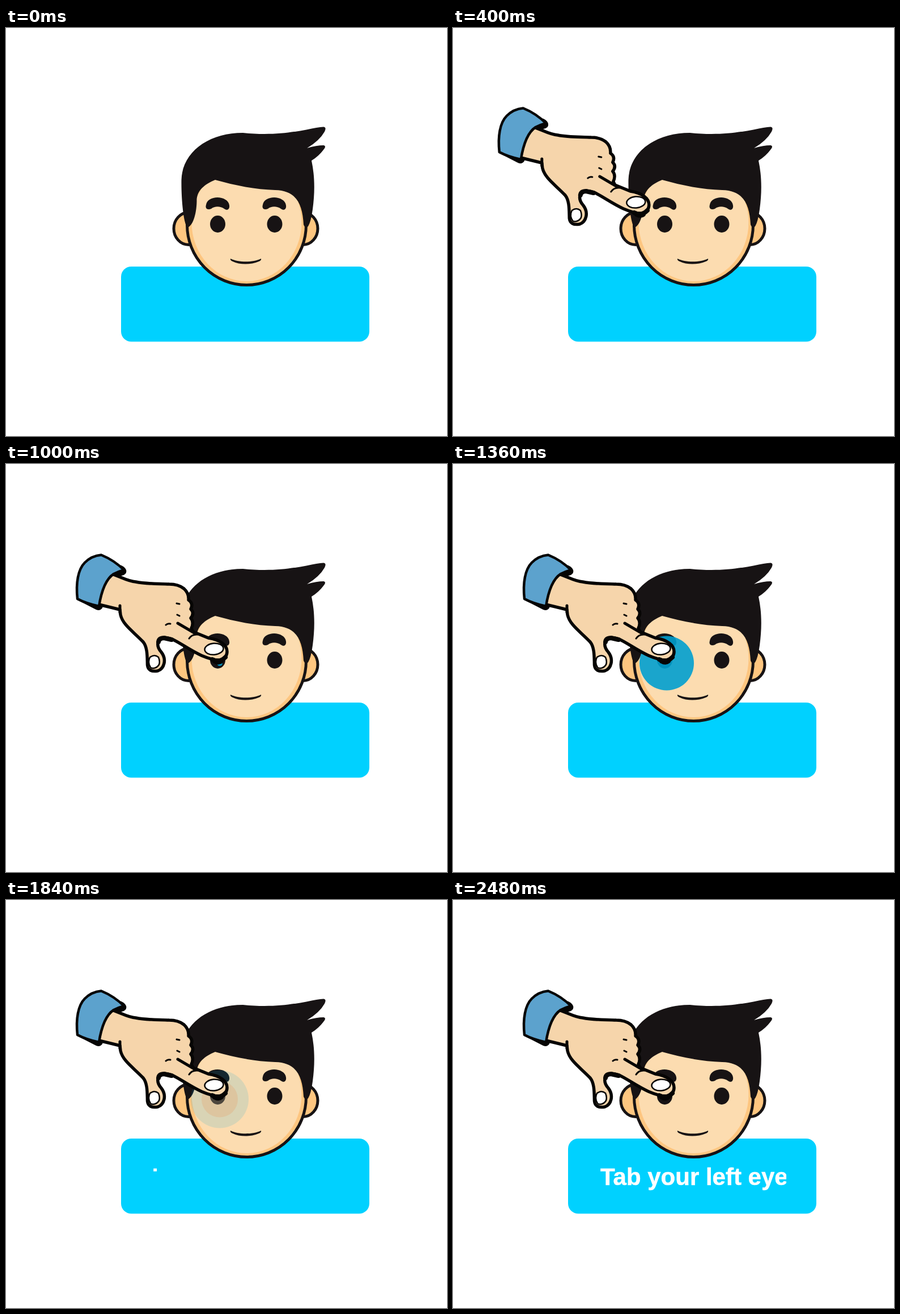
Animation of 778x720 px, one loop 4800 ms. Source, as an HTML page:

```html
<!DOCTYPE html>
<html lang="en">
<head>
<meta charset="utf-8">
<title>Tab your left eye</title>
<style>
html, body { margin: 0; width: 100%; height: 100%; overflow: hidden; background: #fff; }
svg { display: block; width: 100%; height: 100%; }
text { font: bold 42px "Liberation Sans", Arial, sans-serif; fill: #fff; stroke: #fff; stroke-width: .6; stroke-linejoin: round; }
.ink { fill: #171314; }
.line { fill: none; stroke: #060504; stroke-width: 3; }
.bold { stroke-width: 5; }
.heavy { stroke-width: 8; }
</style>
</head>
<body>
<svg viewBox="0 0 778 720">
  <defs>
    <clipPath id="wipe"><rect id="cover" x="250" y="460" width="0" height="60"/></clipPath>
    <path id="brow" d="M353 312C354 304 363 299 373 299S393 304 394 313C395 320 390 323 385 319C378 314 368 314 362 319C355 322 351 318 353 312Z"/>
  </defs>

  <rect x="203" y="421" width="438" height="132.5" rx="18" fill="#00d1ff"/>
  <text x="260" y="502.5" clip-path="url(#wipe)">Tab your left eye</text>

  <g id="head">
    <g fill="#fec680" stroke="#171314" stroke-width="5">
      <ellipse cx="322" cy="354" rx="26" ry="28.5"/>
      <ellipse cx="524" cy="354" rx="26" ry="28.5"/>
      <ellipse cx="424.5" cy="347.5" rx="105" ry="106"/>
    </g>
    <ellipse cx="424.5" cy="343" rx="97" ry="104" fill="#fcdcb0"/>
    <g class="ink">
      <path d="M320 352C313 345 309 300 309.5 268C311 218 358 185 418 185C465 190 500 185 530 179.5Q550 175 560 174.5Q566 175 562 183Q553 199 531 212Q548 207 560 207Q566 208 560 215Q552 226 539 234C545 262 545 290 541 320Q538 342 533 350Q528 355 525 347C523 310 512 287 475 286C440 285 405 278 369 268C350 276 336 287 336.5 306C336 330 329 350 320 352Z"/>
      <use href="#brow"/>
      <use href="#brow" x="100"/>
      <ellipse cx="373.5" cy="346" rx="13.5" ry="15"/>
      <ellipse cx="474" cy="346" rx="13.5" ry="15"/>
      <path d="M396 407C410 414 436 414 450 407Q451 410 446 412C432 418 412 418 400 412Q395 410 396 407Z"/>
    </g>
  </g>

  <g id="ripple">
    <circle cx="377" cy="351.5"/>
    <circle cx="377" cy="351.5"/>
    <circle cx="376" cy="351.5"/>
  </g>

  <g id="hand" stroke-linejoin="round" stroke-linecap="round">
    <path fill="#060504" d="M126 240L157 256Q165 261 170 254L172 246L204 197Q214 195 212 187Q209 180 200 178Z"/>
    <path fill="#f6d5ab" stroke="#060504" stroke-width="5.5" d="M180 192C200 197 213 207 229 208C248 212 268 211 288 212Q304 212 314 220Q323 228 322 240Q331 246 326 256Q333 263 326 272Q332 279 327 290L330 296L357 307C378 310 390 320 390 331Q390 342 378 346Q366 347 345 338C325 329 308 316 293 309Q276 303 269 312Q265 322 274 332C284 345 279 361 268 365Q251 368 249.500 355C249 341 250 324 242 314C225 296 206 284 202 266L201 257L160 247Z"/>
    <path fill="#5ca2cd" stroke="#060504" stroke-width="4.5" d="M168 160.5C184 167 197 176 208 187Q198 190 190 194C176 203 168 226 164 251Q141 246 126 238C123 210 127 186 139 174Q151 162 168 160.5Z"/>
    <path class="line bold" d="M201 250V262M303 281L332 298"/>
    <path class="line heavy" d="M269 314Q270 307 279 307L292 310M364 345Q376 352 387 341M368 348Q375 352 380 348"/>
    <path class="line" d="M301 246L306 247M302 266L306 268M282 284Q285 281 290 282M323 308Q328 300 338 301"/>
    <g fill="#fff" stroke="#060504" stroke-width="2.5">
      <ellipse cx="367" cy="326.5" rx="16.5" ry="10" transform="rotate(-5 367 326.5)"/>
      <path d="M254 341Q262 335 269 341Q272 348 270 354Q265 362 256 360Q249 351 254 341Z"/>
    </g>
  </g>
</svg>
<script>
const $ = id => document.getElementById(id);
const hand = $("hand"), cover = $("cover"), discs = $("ripple").children;
const LOOP = 4800, STEP = 40;
const BLUE = [0, 160, 208], TAN = [230, 155, 100], TEAL = [10, 125, 160];

const ramp = (t, a, b) => Math.min(1, Math.max(0, (t - a) / (b - a)));
const smooth = u => u * u * (3 - 2 * u);
const mix = (a, b, u) => a + (b - a) * u;

function disc(i, r, color, alpha) {
  discs[i].setAttribute("r", r);
  discs[i].setAttribute("fill", `rgb(${color})`);
  discs[i].setAttribute("opacity", alpha);
}

function draw(t) {
  const away = 1 - smooth(ramp(t, 130, 860));
  hand.setAttribute("transform", `translate(${-64 * away} ${-27.5 * away})`);
  hand.setAttribute("opacity", ramp(t, 0, 240));

  const fade = t < 1600 ? mix(.95, .48, ramp(t, 1330, 1600)) : mix(.48, 0, ramp(t, 1600, 1940));
  disc(0, 48 * ramp(t, 860, 1300) ** 2 + 3 * ramp(t, 1600, 1840), BLUE, fade);

  const turn = ramp(t, 1600, 1840);
  disc(1, 25 * ramp(t, 1400, 1600) + 7 * turn, BLUE.map((c, i) => mix(c, TAN[i], turn)),
    mix(.5, .27, turn) * (1 - ramp(t, 1840, 2000)));
  disc(2, 16 * ramp(t, 1440, 1600), TEAL, .5 * (1 - ramp(t, 1600, 1800)));

  cover.setAttribute("width", t < 1840 ? 0 : Math.min(345, 16 + .503 * (t - 1840)));
}

const start = performance.now();
function tick() {
  const t = (performance.now() - start) % LOOP;
  draw(Math.floor(t / STEP) * STEP);
  requestAnimationFrame(tick);
}
tick();
</script>
</body>
</html>
```
